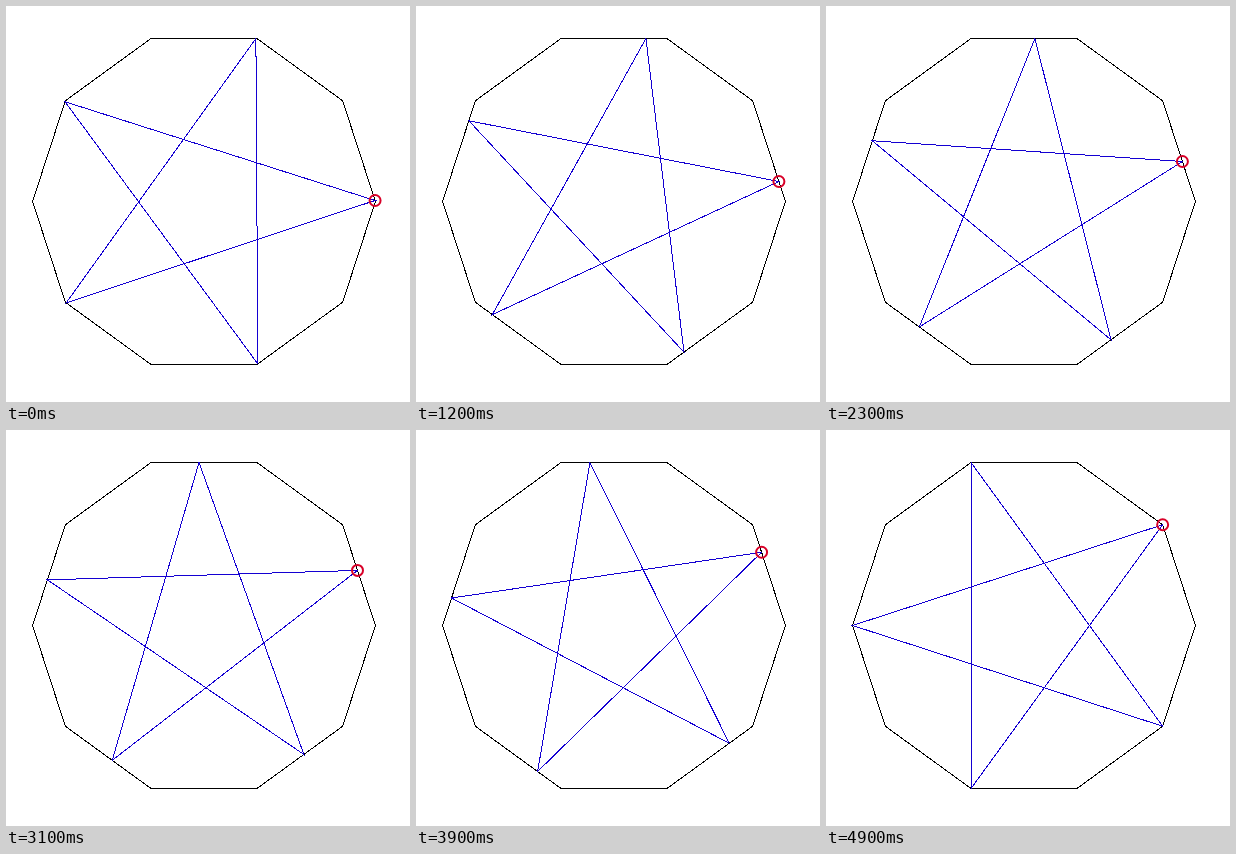
Recreate the animation shown at these times as an HTML page. Size 404 px wide and 396 px high, loop 5 s.

```html
<!DOCTYPE html>
<html lang="en">
<head>
<meta charset="utf-8">
<title>Star in a decagon</title>
<style>
html, body { margin: 0; width: 100%; height: 100%; overflow: hidden; background: #fff; }
svg { display: block; fill: none; }
polygon { shape-rendering: crispEdges; }
</style>
</head>
<body>
<svg width="404" height="396" viewBox="0 0 404 396">
  <polygon id="frame" stroke="#000"/>
  <polygon id="star" stroke="#1400d2"/>
  <circle id="ring" r="5.5" stroke="#d80028" stroke-width="2"/>
</svg>
<script>
const CX = 198, CY = 195.5, R = 171.4, STEP = 100, STEPS = 50;
// [step, share of one side travelled]
const keys = [[0, .01], [8, .118], [16, .279], [23, .397], [31, .547], [39, .727], [48, .915], [49, 1]];
const [frame, star, ring] = ['frame', 'star', 'ring'].map(id => document.getElementById(id));

function corner(i) {
  const a = i * Math.PI / 5;
  return [CX + R * Math.cos(a), CY - R * Math.sin(a)];
}

// Point on the outline; whole numbers are corners
function along(pos) {
  const i = Math.floor(pos), f = pos - i, a = corner(i), b = corner(i + 1);
  return a.map((v, k) => v + (b[k] - v) * f);
}

function progress(step) {
  const n = Math.max(1, keys.findIndex(k => k[0] >= step));
  const [s0, u0] = keys[n - 1], [s1, u1] = keys[n];
  return u0 + (u1 - u0) * (step - s0) / (s1 - s0);
}

function draw(time) {
  const u = progress(Math.floor(time / STEP) % STEPS);
  const tips = [0, 4, 8, 2, 6].map(i => along(i + u));
  star.setAttribute('points', tips.join(' '));
  ring.setAttribute('cx', tips[0][0]);
  ring.setAttribute('cy', tips[0][1]);
}

frame.setAttribute('points', Array.from({ length: 10 }, (_, i) => corner(i)).join(' '));
const start = performance.now();
function tick() {
  draw(performance.now() - start);
  requestAnimationFrame(tick);
}
tick();
</script>
</body>
</html>
```
